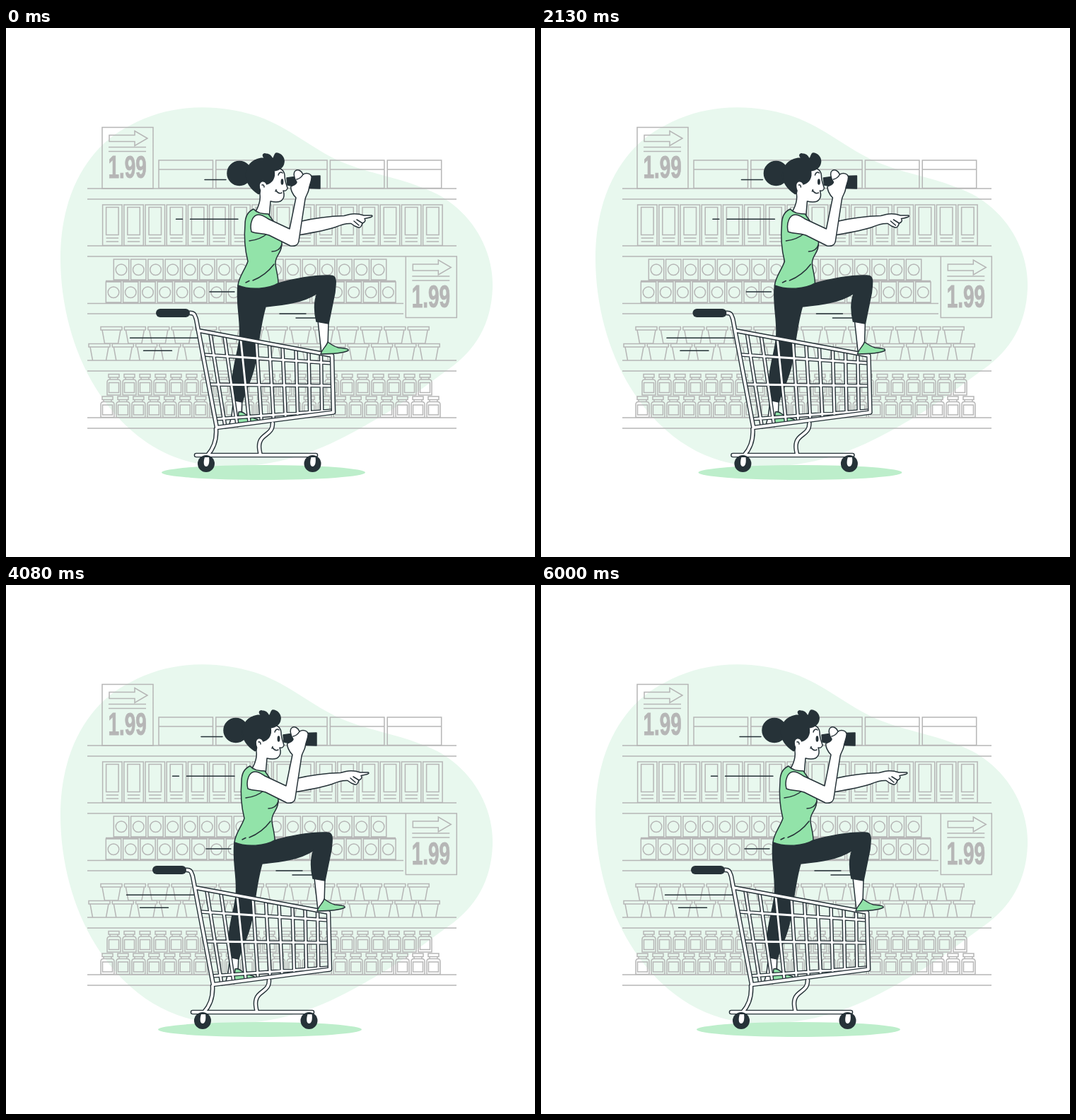
An HTML page that plays this animation: 748x748 px, repeating every 6.04 s.

```html
<!DOCTYPE html>
<html lang="en">
<head>
<meta charset="utf-8">
<title>Shopping trip</title>
<style>
  html, body { margin: 0; width: 100%; height: 100%; overflow: hidden; background: #fff; }
  svg { display: block; width: 100vw; height: 100vh; }
  .shelf { fill: none; stroke: #b6b6b6; stroke-width: 1.5; }
  .price { font: bold 45px "Liberation Sans", Arial, sans-serif; fill: #b6b6b6; stroke-width: 1; }
  .ink { fill: none; stroke: #263238; stroke-width: 1.5; stroke-linecap: round; stroke-linejoin: round; }
  .skin { fill: #fff; }
  .green { fill: #92e3a9; }
  .dark { fill: #263238; }
  .tube { fill: none; stroke-linecap: round; stroke-linejoin: round; }
</style>
</head>
<body>
<svg viewBox="0 0 748 748">
  <path fill="#e8f8ee" d="M77 325C77 230 120 165 175 138C235 105 300 108 350 123C395 137 425 165 465 185C510 207 560 210 610 235C660 262 690 315 688 368C686 418 665 455 625 483C585 512 555 536 515 558C460 590 400 619 320 620C240 622 185 585 145 535C100 478 77 400 77 325Z"/>

  <defs>
    <g id="sign">
      <path d="M136 140.500h72v86.500h-72zM146 151.500h36v-6l18 10.500l-18 10.500v-6h-36zM145 168.500h53M145 174.500h53"/>
      <text class="price" transform="translate(144.500 212) scale(.62 1)">1.99</text>
    </g>
  </defs>
  <g class="shelf">
    <path id="goods"/>
    <use href="#sign"/>
    <use href="#sign" x="429.300" y="182.500"/>
  </g>

  <g id="rider">
    <ellipse cx="364" cy="628.500" rx="144" ry="10.500" fill="#bdeecb"/>
    <path class="ink" d="M281 214.500h30M240.500 270.300h9M260.500 270.300h67.500M288 373h35M387 404h37M410 410h28M175.500 438.300h95M194.500 456.300h40"/>

    <g class="ink">
      <!-- far arm -->
      <path class="skin" d="M404 276L416 273.500C440 268 460 266 478 265.500L486 263.500C493 262 500 263 506 265L517 265C520 266.500 516 268 507 269.500C509 273 507 275 504 276C503 280 501 283 498 282C494 281 491 279 488 276.500C482 276 474 278 466 281.500C450 287 430 290 412 293L400 295Z"/>
      <path d="M496 271L504 276M492 273L499 279"/>

      <!-- standing foot and legs -->
      <path class="skin" d="M322 524L319 548L316 560H330L333 545L334 524Z"/>
      <path class="green" d="M329 543C335 541 338 547 345 550C352 552 358 553 358 558L327 561Z"/>
      <path class="skin" d="M441 414L446 460L455 450L456 416Z"/>
      <path class="dark" d="M328 364C325 392 333 415 330 440C328 462 317 485 320 526L334 529C338 514 346 500 351 480C357 455 358 425 367 394C395 391 420 388 440 375C435 388 436 402 439 415L456 418L465 374C466 362 469 350 459 350C435 349 405 355 385 361Z"/>

      <!-- head -->
      <path class="skin" d="M378 200C386 196 393 200 394 208C394 216 396 220 398 226C398 229 395 231 392 230C394 236 393 242 388 245C383 247 378 246 374 245L372 269L352 261C359 250 361 240 358 230L366 210Z"/>
      <circle class="dark" cx="330" cy="205.500" r="17"/>
      <path class="dark" d="M339 207C341 191 352 184 366 184C362 181 363 177 367 178C371 178 375 181 377 185C380 183 379 178 382 177C389 177 394 184 393 190C392 197 386 201 379 202C381 212 376 219 368 221C364 215 357 219 359 227C361 232 358 236 356 234C347 228 339 218 339 207Z"/>
      <path class="skin" d="M368 221C365 215 358 217 359 224C359 229 362 232 365 230" stroke="none"/>
      <path d="M385 208C386 204 389 203 391 205M382 230C384 233 387 234.500 390 233M382 228.500L381 231M362 222C364 221 365 223 365 225"/>
      <ellipse class="dark" cx="390.500" cy="217.500" rx="1.200" ry="3.600"/>

      <!-- torso -->
      <path class="green" d="M350 256C343 259 338 266 338 278C336 300 339 318 342 330C338 342 329 352 328 364C345 371 372 369 385 361C385 350 381 340 381 332C381 321 391 318 390 303C388 290 380 275 371 263C364 263 355 262 350 256Z"/>
      <path d="M376 316C384 316 388 312 390 306M344 301C354 300 362 297 369 291M339 360L344 357.500M349 357C364 351 373 342 379 334"/>

      <!-- near arm and binoculars -->
      <path class="dark" d="M397 212L411 210L444 209V227L418 226L398 222Z"/>
      <path class="skin" d="M347 288C344 276 349 264 357 264C363 264 366 267 371 270L401 284L410 240C405 235 402 228 403 224C406 222 410 222 411 218C407 212 406 204 409 202C413 199 418 202 420 207C425 204 431 206 432 210C433 215 429 221 428 229C427 234 424 237 423 242L414 301C413 308 407 309 402 308L372 293C362 290 354 291 347 288Z"/>
      <path d="M411 214C415 213 418 211 420 207"/>
    </g>

    <!-- cart -->
    <path id="wires" class="tube"/>
    <path id="frame" class="tube"/>
    <path class="ink" style="stroke-width:12" d="M218 403H254"/>
    <g id="wheels"></g>
    <path class="ink green" d="M455 444C453 450 447 454 445 461C455 461 474 461 484 456C485 453 477 453 470 452C463 450 459 447 455 444Z"/>
  </g>
</svg>
<script>
const $ = id => document.getElementById(id);
const line = (a, b, c, d) => `M${a} ${b}L${c} ${d}`;
const box = (x, y, w, h) => `M${x} ${y}h${w}v${h}h${-w}z`;
const circle = (x, y, r) => `M${x - r} ${y}a${r} ${r} 0 1 0 ${2 * r} 0a${r} ${r} 0 1 0 ${-2 * r} 0`;
const row = (n, x, step, draw) => Array.from({ length: n }, (_, i) => draw(x + i * step)).join('');

const carton = x => box(x, 187, 76.5, 39.5) + line(x, 200, x + 76.5, 200);
const packet = x => box(x, 250, 27.5, 57.5) + box(x + 5, 253.5, 17.5, 39) +
  line(x + 5, 297, x + 22.5, 297) + line(x + 5, 302, x + 22.5, 302);
const cube = y => x => box(x - 10.7, y, 21.4, 29) + circle(x, y + 14.8, 7.8);
const cup = y => x => box(x, y, 30, 4.5) + `M${x + 2} ${y + 4.5}l3.5 19h19l3.5 -19`;
const jar = y => x => box(x + 2, y, 15, 4.5) +
  `M${x + 4} ${y + 4.5}v3q-4 0 -4 4v18h19v-18q0 -4 -4 -4v-3M${x + 4} ${y + 7.5}h11` +
  box(x + 2.5, y + 12, 14, 14);

$('goods').setAttribute('d',
  [227, 242, 308, 323, 389.5, 404, 470, 485, 551, 566]
    .map(y => line(115, y, y > 380 && y < 410 ? 562 : y === 323 ? 565 : 637, y)).join('') +
  row(5, 216, 80.8, carton) +
  row(16, 136.6, 30.2, packet) +
  row(16, 163, 24.27, cube(327)) + row(17, 152, 24.27, cube(359)) + line(141, 357.5, 551, 357.5) +
  row(14, 134, 33.4, cup(422.5)) + row(15, 117, 33.3, cup(446.5)) +
  row(21, 143, 22, jar(489.5)) + row(22, 134, 21.95, jar(521)));

// Each tube is a dark stroke with a thinner white stroke on top.
function tube(path, d, width) {
  path.setAttribute('d', d);
  const core = path.cloneNode();
  core.removeAttribute('id');
  path.setAttribute('stroke', '#263238');
  path.setAttribute('stroke-width', width);
  core.setAttribute('stroke', '#fff');
  core.setAttribute('stroke-width', width - 2.8);
  path.after(core);
}

const tops = [289, 309, 332, 354, 372.5, 391, 410, 428, 445.5];
const bars = tops.map((x, i) =>
  line(x, 430 + (x - 273) * 0.185, 310 + i * 17.1, 564 - i * 2.35)).join('');
const rails = line(280, 462, 461, 474) + line(287, 504, 462, 506) + line(296, 553, 462, 541);
tube($('wires'), bars + rails, 5.6);
tube($('frame'),
  'M258 403C267 402 267 406 269 412L298 565L463 543.500L461 463L273 428' +
  'M297 567C298 582 294 594 285 604M377 559C377 572 368 573 362 580C356 587 358 596 360 604' +
  'M269 604H438', 6.6);

$('wheels').innerHTML = [283, 433.5].map(x =>
  `<circle class="dark" cx="${x}" cy="616" r="12"/>
   <path fill="#fff" d="M${x - 2} 607h6c1 6 0 13 -4 13c-4 0 -4 -7 -2 -13z"/>`).join('');

// Side-to-side shake, one key position per tenth of the cycle.
const keys = [0, -1, 2, -4, 4, -4, 4, -4, 2, -1, 0];
const start = performance.now();
function frame() {
  const t = Math.max(0, performance.now() - start) % 6040;
  const p = ((t + 80) % 6000) / 600;
  const i = Math.floor(p);
  const x = (keys[i] + (keys[i + 1] - keys[i]) * (p - i)) * 1.496 + 0.2;
  $('rider').setAttribute('transform', `translate(${x.toFixed(3)} 0)`);
  requestAnimationFrame(frame);
}
frame();
</script>
</body>
</html>
```
